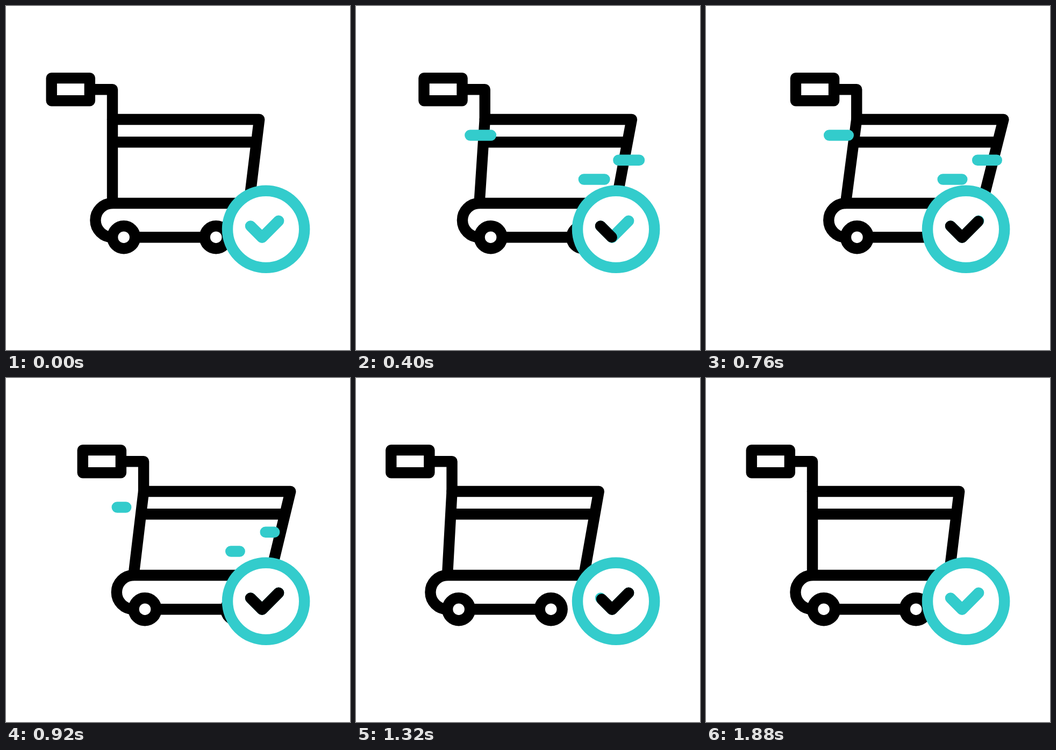
Animation, 640 px wide and 640 px high, one loop 2000 ms. Source, as an HTML page:

```html
<!DOCTYPE html>
<html lang="en">
<head>
<meta charset="utf-8">
<title>Cart check</title>
<style>
  html, body { margin: 0; width: 100%; height: 100%; overflow: hidden; background: #fff; }
  svg { display: block; width: 100%; height: 100%; }
  .line { fill: none; stroke: #000; stroke-width: 20.4; stroke-linecap: round; stroke-linejoin: round; }
  .teal { stroke: #3cc; }
  .solid { fill: #fff; }
</style>
</head>
<body>
<svg viewBox="0 0 640 640">
  <path id="handle" class="line" d="M84.7 134.1H155.8V176.3H84.7ZM155.8 155.2H198V211"/>
  <path id="basket" class="line"/>
  <g id="base">
    <path class="line" d="M198 367A31.6 31.6 0 0 0 198 430.2H390.5"/>
    <circle class="line solid" cx="219.1" cy="430.2" r="21"/>
    <circle class="line solid" cx="390.7" cy="430.2" r="21"/>
  </g>
  <path id="wind" class="line teal"/>
  <circle class="line teal solid" cx="483.6" cy="415.3" r="71.6"/>
  <path class="line teal" d="M455 409.4L476.4 430.8L507.2 399.8"/>
  <path id="sweep" class="line" pathLength="1" d="M455 409.4L476.4 430.8L507.2 399.8"/>
</svg>
<script>
const LOOP = 2000, STEP = 40, LAST = 1880;
const TOP = 211, BOTTOM = 367, BAR = 253.3;
const STREAKS = [[0, 240.5], [276, 286.7], [211.5, 322.5]];
const [handle, basket, base, wind, sweep] =
  ['handle', 'basket', 'base', 'wind', 'sweep'].map(id => document.getElementById(id));

// Eased progress, 0 to 1, between two times
function ease(t, from, to) {
  const u = Math.min(1, Math.max(0, (t - from) / (to - from)));
  return u * u * (3 - 2 * u);
}

// Eased value through [time, value] keys
function track(t, keys) {
  let value = keys[0][1];
  for (let i = 1; i < keys.length; i++) {
    value += (keys[i][1] - keys[i - 1][1]) * ease(t, keys[i - 1][0], keys[i][0]);
  }
  return value;
}

const drive = t => track(t, [[80, 0], [720, 63], [1320, -28], [1800, 0]]);
const lean = t => track(t, [[80, 0], [720, 20.5], [1800, 0]]);

function basketPath(top, bottom) {
  const mix = (a, b) => a + (b - a) * (BAR - TOP) / (BOTTOM - TOP);
  const l1 = 198 + top, l2 = 198 + bottom, r1 = 471.2 + top, r2 = 452.2 + bottom;
  return `M${l1} ${TOP}H${r1}L${r2} ${BOTTOM}H${l2}Z` +
    `M${mix(l1, l2)} ${BAR}H${mix(r1, r2)}`;
}

function windPath(t, x) {
  const left = x + 219.5 - 52.2 * ease(t, 80, 560);
  const right = x + 219.5 - 52.2 * ease(t, 520, 1160);
  if (right - left < 0.1) return '';
  return STREAKS.map(([dx, y]) => `M${left + dx} ${y}H${right + dx}`).join('');
}

function draw(t) {
  const x = drive(t), top = x + lean(t);
  handle.setAttribute('transform', `translate(${top})`);
  base.setAttribute('transform', `translate(${x})`);
  basket.setAttribute('d', basketPath(top, x));
  wind.setAttribute('d', windPath(t, x));

  const start = ease(t, 1250, 1830), length = ease(t, 90, 810) - start;
  sweep.style.display = length > 0.001 ? '' : 'none';
  sweep.setAttribute('stroke-dasharray', `${length} 3`);
  sweep.setAttribute('stroke-dashoffset', -start);
}

const origin = performance.now();
function tick() {
  const t = (performance.now() - origin) % LOOP;
  draw(Math.min(LAST, Math.floor(t / STEP) * STEP));
  requestAnimationFrame(tick);
}
tick();
</script>
</body>
</html>
```
